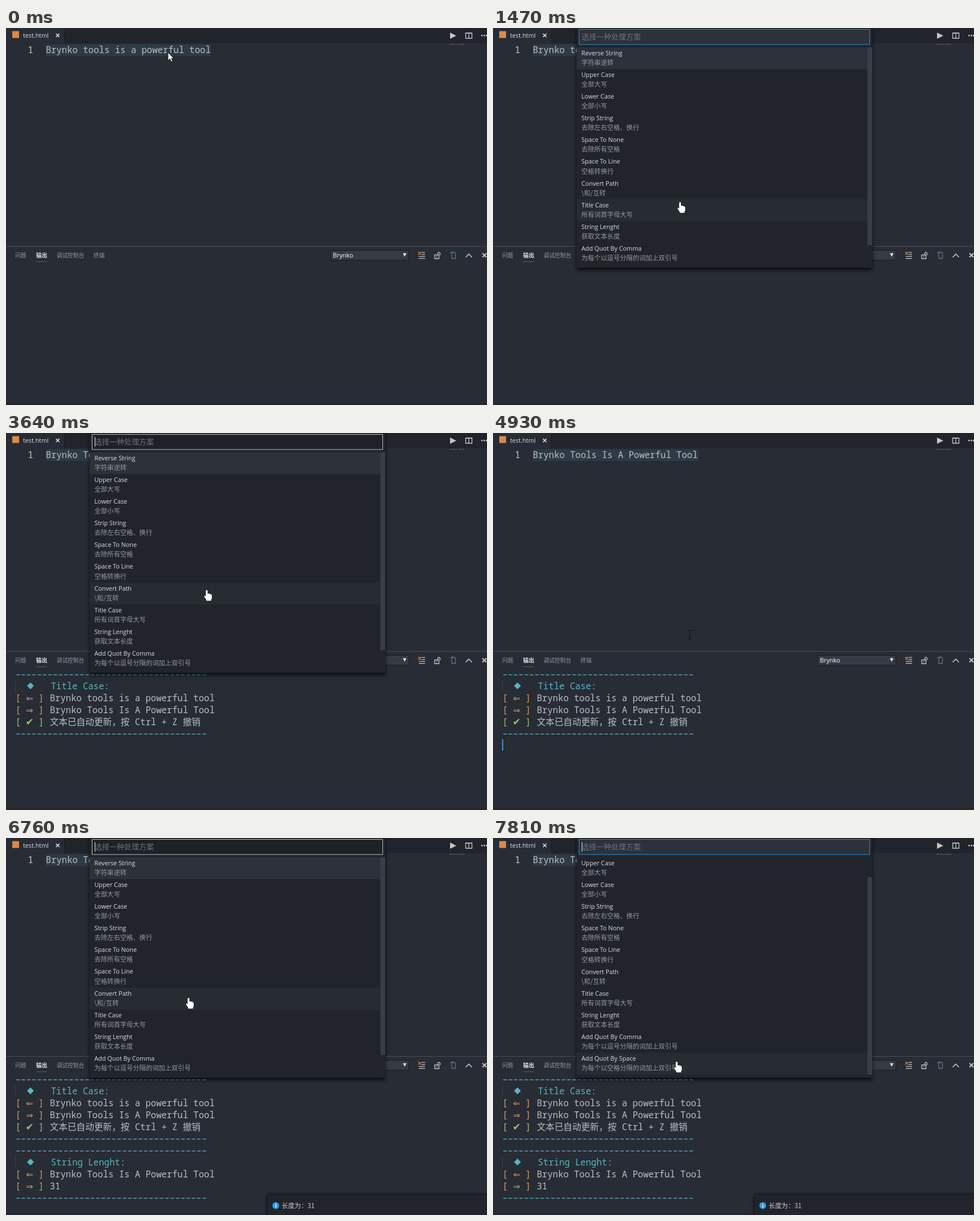
Recreate the animation shown at these times as an HTML page. Size 846x662 px, loop 8 s.

```html
<!DOCTYPE html>
<html lang="zh-CN">
<head>
<meta charset="utf-8">
<title>Editor text tools</title>
<style>
  html, body { margin: 0; width: 100%; height: 100%; overflow: hidden; background: #282c34; }
  svg { display: block; width: 846px; height: 662px; cursor: default; }
  text { white-space: pre; }
  .ui { font: 500 10.8px "Open Sans", "Noto Sans CJK SC", "Noto Sans CJK", sans-serif; fill: #dcdfe4; }
  .cn { font: 11.3px "Noto Sans CJK SC", "Noto Sans CJK", sans-serif; fill: #949aa1; }
  .tab { font-size: 9.7px; }
  .code { font: 15.6px "Noto Sans Mono", "Noto Sans CJK SC", "Noto Sans CJK", monospace; fill: #bbbfc6; }
  .thin { font-family: "Noto Sans CJK SC", "Noto Sans CJK", sans-serif; font-weight: 300; }
  .sym { font: 15px "DejaVu Sans", sans-serif; text-anchor: middle; }
  .teal { fill: #56b6c2; }
  .orange { fill: #d19a66; }
  .green { fill: #98c379; }
  .sym.green { font-size: 17px; }
  .icon { fill: none; stroke: #c5c5c5; stroke-width: 1.3; }
  #palette { filter: drop-shadow(0 4px 3px rgba(0, 0, 0, .75)); }
</style>
</head>
<body>
<svg id="stage" viewBox="0 0 846 662"></svg>
<script>
const LOOP = 8000, ROW = 38.15, LIST_TOP = 34;
const PLAIN = 'Brynko tools is a powerful tool';
const TITLE = PLAIN.replace(/\b\w/g, c => c.toUpperCase());
const ITEMS = [
  ['Reverse String', '字符串逆转'],
  ['Upper Case', '全部大写'],
  ['Lower Case', '全部小写'],
  ['Strip String', '去除左右空格、换行'],
  ['Space To None', '去除所有空格'],
  ['Space To Line', '空格转换行'],
  ['Convert Path', '\\和/互转'],
  ['Title Case', '所有词首字母大写'],
  ['String Lenght', '获取文本长度'],
  ['Add Quot By Comma', '为每个以逗号分隔的词加上双引号'],
  ['Add Quot By Space', '为每个以空格分隔的词加上双引号']
];

const rect = (x, y, w, h, fill, more = '') =>
  `<rect x="${x}" y="${y}" width="${w}" height="${h}" fill="${fill}" ${more}/>`;
const text = (x, y, cls, s, more = '') => `<text x="${x}" y="${y}" class="${cls}" ${more}>${s}</text>`;
const icon = (d, more = '') => `<path class="icon" d="${d}" ${more}/>`;
const thin = s => `<tspan class="thin">${s}</tspan>`;

// Output panel rows
const lineY = n => 429.3 + n * 20.8;
const rule = n => text(16.5, lineY(n), 'code teal', '–'.repeat(36));
const heading = (n, s) =>
  rect(16, lineY(n) - 17, 1, 21, '#3b4048') +
  `<path class="teal" d="M43 ${lineY(n) - 12}l6 6-6 6-6-6z"/>` +
  text(79, lineY(n), 'code teal', s);
const entry = (n, mark, color, s) =>
  text(16.5, lineY(n), `code ${color}`, '[') +
  text(41.5, lineY(n), `sym ${color}`, mark) +
  text(57.3, lineY(n), `code ${color}`, ']') +
  text(77, lineY(n), 'code', s);
const caret = (id, y) => rect(16, y, 2, 20, '#528bcf', `id="${id}"`);

const editor = `
  ${rect(0, 0, 846, 662, '#282c34')}
  ${rect(102, 0, 744, 27, '#21252b')}
  ${rect(102, 0, 1, 27, '#1b1e23')}
  ${rect(11, 5.5, 12, 12, '#d98a4b')}
  ${text(30, 17, 'ui', 'test.html')}
  ${icon('M88 10l6 6m0-6l-6 6', 'style="stroke:#e4e6ea;stroke-width:1.6"')}
  <path d="M781 8l11 5.5-11 5.5z" fill="#c5c5c5"/>
  ${icon('M808.5 9h11v9h-11zM814 9v9M808 8.6h12')}
  <path d="M836 12h2.4v2.4h-2.4zM840 12h2.4v2.4h-2.4zM844 12h2.4v2.4h-2.4z" fill="#c5c5c5"/>
  ${rect(70, 28.5, 291, 20.5, '#2e3a45')}
  ${text(38.5, 44.3, 'code', '1', 'style="fill:#c8ccd2"')}
  ${text(70, 44.3, 'code', PLAIN, 'id="doc"')}
  <path d="M780 28.5h27" stroke="#666b74" stroke-dasharray="5 1 4 1 2 1 1 1"/>`;

const panel = `
  ${rect(0, 383, 846, 1, '#4a4e57')}
  ${rect(0, 659, 846, 3, '#25262e')}
  ${text(16, 402.5, 'cn tab', '问题')}
  ${text(53, 402.5, 'cn tab', '输出', 'style="fill:#e4e6ea;font-weight:bold"')}
  ${rect(53, 410, 19, 1, '#5a5f69')}
  ${text(89, 402.5, 'cn tab', '调试控制台')}
  ${text(154, 402.5, 'cn tab', '终端')}
  ${rect(571.5, 390.5, 137, 17, '#353b45', 'stroke="#181a1f"')}
  ${text(575, 403, 'ui', 'Brynko', 'style="fill:#fff"')}
  <path d="M698 395.5h6.4l-3.2 6z" fill="#e4e6ea"/>
  ${icon('M731 394.2h6M731 397.7h6M726 401.2h11M726 404.7h11')}
  ${icon('M725 393l5 5m0-5l-5 5', 'style="stroke:#d08350"')}
  ${icon('M754 398.5h7.5v6.5h-7.5zM759.5 398v-2q0-2 2-2t2 2v3M757.7 400.5v2')}
  ${icon('M784 396.5v8h6.5v-9l-2-2h-2.5', 'style="stroke:#6b7078"')}
  ${icon('M781 394.5h5m-2-2l2 2-2 2', 'style="stroke:#3f7a99"')}
  ${icon('M808.5 402.5l5.5-5.5 5.5 5.5', 'style="stroke-width:1.6"')}
  ${icon('M838 395.5l7 7m0-7l-7 7', 'style="stroke-width:2"')}
  <g id="first">
    ${rule(0)}${heading(1, 'Title Case:')}
    ${entry(2, '⇐', 'orange', PLAIN)}${entry(3, '⇒', 'orange', TITLE)}
    ${entry(4, '✔', 'green', `${thin('文本已自动更新，按')} Ctrl + Z ${thin('撤销')}`)}${rule(5)}
  </g>
  <g id="second">
    ${rule(6)}${heading(7, 'String Lenght:')}
    ${entry(8, '⇐', 'orange', TITLE)}${entry(9, '⇒', 'orange', TITLE.length)}${rule(10)}
  </g>
  ${caret('caretA', 538)}${caret('caretB', 643)}
  <g id="toast">
    ${rect(460, 627, 390, 40, '#21252b', 'style="filter:drop-shadow(0 0 3px #000)"')}
    <circle cx="474.5" cy="645.5" r="6" fill="#2f9be6"/>
    ${rect(473.8, 644.5, 1.5, 4.5, '#fff')}${rect(473.8, 642, 1.5, 1.5, '#fff')}
    ${text(485, 650, 'cn', '长度为：31', 'style="fill:#c8ccd2"')}
  </g>`;

const rows = ITEMS.map(([name, note], i) =>
  text(155.5, LIST_TOP + i * ROW + 13.7, 'ui', name) +
  text(155.5, LIST_TOP + i * ROW + 30.8, 'cn', note)).join('');

const palette = `
  <clipPath id="view">${rect(147, 34, 520, 382, '#000')}</clipPath>
  <g id="palette">
    ${rect(147, -8, 520, 429, '#21252b')}
    ${rect(151.5, 2.5, 511, 26.5, '#2c313a', 'id="field"')}
    ${text(156, 19.5, 'cn', '选择一种处理方案', 'style="font-size:13px;fill:#6d727b"')}
    ${rect(156, 7, 1, 17, '#d7dae0', 'id="fieldCaret"')}
    <g clip-path="url(#view)">
      <g id="list">
        ${rect(147, LIST_TOP, 520, ROW, '#2c313a')}
        ${rect(147, 0, 520, ROW, '#272b32', 'id="hover"')}
        ${rows}
      </g>
      ${rect(658.5, LIST_TOP, 8.5, 347, '#383d48', 'id="slider"')}
    </g>
  </g>`;

const pointers = `
  <g id="pointer">
    <path id="arrow" d="M0 0V14L3.3 11 5.6 16.2 7.9 15.2 5.6 10.2H9.8Z" fill="#fff" stroke="#111" stroke-width=".7"/>
    <path id="hand" d="M-2 1.5Q0-1 2 1.5V7Q4 5.5 5.3 7.3 7.2 6.5 8 8.5 9.6 8 9.6 10V14Q9.6 16 8.2 18V20H-1V18L-4.6 12.5Q-5.6 9.4-3.4 10L-2 11.5Z" fill="#fff" stroke="#15171b" stroke-width=".8"/>
    <path id="beam" d="M-3-7.5h2.5l.5.5.5-.5H3M0-7V7M-3 7.5h2.5L0 7l.5.5H3" fill="none" stroke="#0b0c0e"/>
  </g>`;

document.getElementById('stage').innerHTML = editor + panel + palette + pointers;
const el = {};
document.querySelectorAll('#stage [id]').forEach(n => el[n.id] = n);

// Pointer moves: start, end, hops, from x, y, to x, y
const MOVES = [
  [0, 1, 1, 285, 43, 285, 43],
  [1000, 1470, 6, 285, 43, 329, 305],
  [3640, 4170, 7, 353, 275, 346, 354],
  [5605, 5760, 2, 346, 354, 326, 268],
  [6760, 6990, 3, 321, 280, 323, 318],
  [7075, 7450, 5, 323, 318, 323, 392]
];
const OPEN = [[1000, 2150], [3640, 4930], [6760, LOOP]];
const FIELD_CARET = [[1000, 1390], [3640, 4090], [6760, 7230], [7740, LOOP]];
const CARET_A = [[2320, 3640], [4930, 5010]];

const within = (t, spans) => spans.find(([a, b]) => t >= a && t < b);
const hops = (t, a, b, n) => Math.max(0, Math.min(1, Math.floor((t - a) / (b - a) * n + .001) / n));
const show = (node, on) => node.setAttribute('visibility', on ? 'visible' : 'hidden');

function locate(t) {
  const [a, b, n, x0, y0, x1, y1] = MOVES.filter(m => m[0] <= t).pop();
  const p = hops(t, a, b, n);
  return [x0 + (x1 - x0) * p, y0 + (y1 - y0) * p];
}

function draw(t) {
  const [x, y] = locate(t);
  const open = within(t, OPEN);
  const focused = open && t - open[0] >= 75;
  const scroll = t >= 7590 ? 38 : 0;

  el.doc.textContent = t < 2230 ? PLAIN : TITLE;
  show(el.first, t >= 2230);
  show(el.second, t >= 5010);
  show(el.caretA, within(t, CARET_A));
  show(el.caretB, t >= 5010 && t < 6760);
  show(el.toast, t >= 5080);
  el.toast.setAttribute('transform', `translate(0 ${36 * (1 - hops(t, 5005, 5230, 3))})`);

  el.palette.style.display = open ? '' : 'none';
  el.field.setAttribute('fill', focused ? '#2c313a' : '#1e2126');
  el.field.setAttribute('stroke', focused ? '#2b8fd8' : '#b9bcc1');
  show(el.fieldCaret, within(t, FIELD_CARET));
  const row = Math.floor((y - LIST_TOP + scroll) / ROW);
  el.hover.setAttribute('y', LIST_TOP + row * ROW);
  el.hover.setAttribute('fill', row ? '#272b32' : 'none');
  el.list.setAttribute('transform', `translate(0 ${-scroll})`);
  el.slider.setAttribute('y', LIST_TOP + scroll * .91);

  el.pointer.setAttribute('transform', `translate(${x} ${y})`);
  show(el.arrow, t < 1000);
  show(el.hand, open);
  show(el.beam, t >= 1000 && !open);
}

const start = performance.now();
function tick() {
  draw((performance.now() - start) % LOOP);
  requestAnimationFrame(tick);
}
tick();
</script>
</body>
</html>
```
